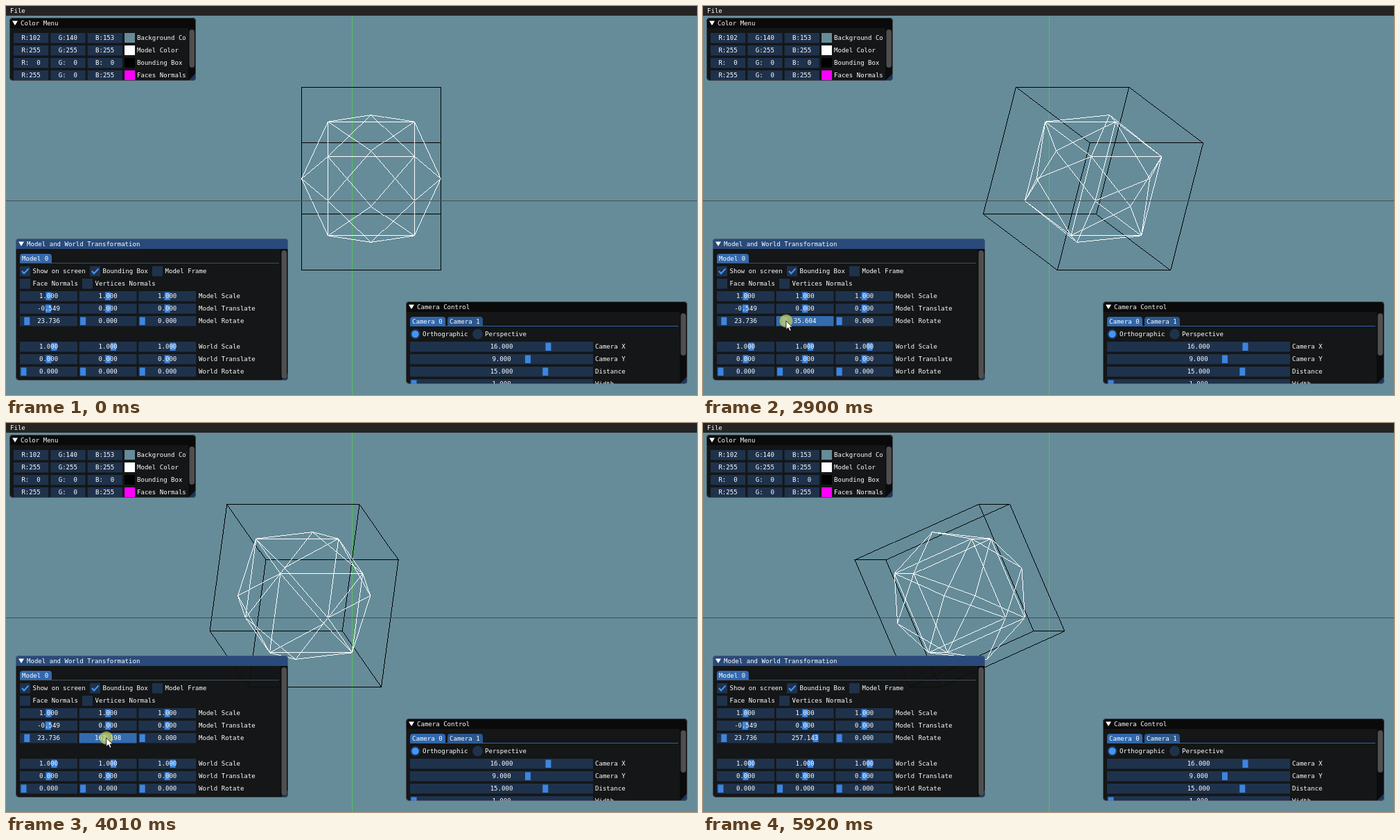
Recreate the animation shown at these times as an HTML page with a canvas. Size 997 px wide and 562 px high, loop 6.71 s.

```html
<!DOCTYPE html>
<html lang="en">
<head>
<meta charset="utf-8">
<title>Model viewer</title>
<style>
  html, body { margin: 0; width: 100%; height: 100%; overflow: hidden; background: #668c99; }
  canvas { display: block; }
</style>
</head>
<body>
<canvas id="stage" width="997" height="562"></canvas>
<script>
const g = document.getElementById('stage').getContext('2d');
const LOOP = 6710, RAD = Math.PI / 180;
const ENTER = 720, PRESS = 1880, RELEASE = 5710, LEAVE = 5915;
const UNIT = 562 / 9, TILT = 23.736, SHIFT = -.549, REACH = 1.608;
const FRAME = '#1f324c', GRAB = '#3d85e0', ACCENT = '#4296fa';

const progress = (t, start, end) => Math.min(1, Math.max(0, (t - start) / (end - start)));

// The drag: [time, slider steps], where 91 steps make a full turn
const drag = [[2240, 0], [2470, 2], [3300, 16], [4010, 41], [4960, 58], [5450, 65]];

function dragSteps(t) {
  return drag.slice(1).reduce((sum, [end, k], i) =>
    sum + (k - drag[i][1]) * progress(t, drag[i][0], end), 0);
}

function pointerAt(t) {
  const left = 1 - progress(t, ENTER, 1330);
  const away = progress(t, RELEASE - 40, 5850) ** 1.5;
  const held = 111.5 + .779 * dragSteps(t + 90);
  const settle = 20 * (1 - progress(t, 1360, 1660));
  return [held + settle + 371 * left ** 1.6 + 385 * away, 455 + 97 * left ** 3 + 70 * away];
}

function rect(x, y, w, h, color, radius = 0) {
  g.fillStyle = color;
  g.beginPath();
  g.roundRect(x, y, w, h, radius);
  g.fill();
}

function disc(x, y, r, color) {
  g.fillStyle = color;
  g.beginPath();
  g.arc(x, y, r, 0, 2 * Math.PI);
  g.fill();
}

function polygon(points, color) {
  g.fillStyle = color;
  g.beginPath();
  points.forEach(p => g.lineTo(...p));
  g.closePath();
  g.fill();
}

function text(s, x, y, align = 'left') {
  g.fillStyle = '#fff';
  g.textAlign = align;
  g.fillText(s, x, y + 3);
}

// Hard-edged one pixel line
function line([x0, y0], [x1, y1], color) {
  const n = Math.max(1, Math.round(Math.max(Math.abs(x1 - x0), Math.abs(y1 - y0))));
  g.fillStyle = color;
  for (let i = 0; i <= n; i++)
    g.fillRect(Math.floor(x0 + (x1 - x0) * i / n), Math.floor(y0 + (y1 - y0) * i / n), 1, 1);
}

function project([x, y, z], angle) {
  const c = Math.cos(TILT * RAD), s = Math.sin(TILT * RAD);
  const depth = y * s + z * c;
  const across = x * Math.cos(angle) + depth * Math.sin(angle) + SHIFT;
  return [498.7 + UNIT * across, 281.5 - UNIT * (y * c - z * s)];
}

const cube = half => [...Array(8).keys()].map(i => [0, 1, 2].map(a => 1 + (i >> a & 1 ? half : -half)));

function drawCube(points, color) {
  for (let i = 0; i < 8; i++)
    for (const bit of [1, 2, 4])
      if (!(i & bit)) line(points[i], points[i | bit], color);
}

function drawScene(angle) {
  const flat = p => project(p, angle);
  const corners = cube(1).map(flat);
  rect(0, 0, 997, 562, '#668c99');
  rect(499, 14, 1, 548, '#55c05a');
  drawCube(cube(REACH).map(flat), '#000');
  drawCube(corners, '#fff');
  for (let axis = 0; axis < 3; axis++)
    for (const side of [0, 1]) {
      const pole = [1, 1, 1];
      pole[axis] += side ? REACH : -REACH;
      corners.forEach((p, i) => { if ((i >> axis & 1) === side) line(flat(pole), p, '#fff'); });
    }
  rect(0, 281, 997, 1, '#434f52');
}

function panel(x, y, w, h, title, titleColor, bar, content) {
  g.save();
  g.beginPath();
  g.roundRect(x, y, w, h, 5);
  g.clip();
  rect(x, y, w, h, 'rgba(15,15,15,.94)');
  rect(x, y, w, 15, titleColor);
  polygon([[x + 4, y + 4.5], [x + 12, y + 4.5], [x + 8, y + 11]], '#fff');
  text(title, x + 16, y + 7.5);
  content();
  rect(x + w - 11, y + 15, 11, h - 15, 'rgba(5,5,5,.53)');
  polygon([[x + w, y + h - 11], [x + w, y + h], [x + w - 11, y + h]], '#1d3655');
  rect(x + w - 9.5, y + 17, 7.5, bar, '#4f4f4f', 4);
  g.restore();
  g.strokeStyle = 'rgba(110,110,128,.5)';
  g.lineWidth = 1;
  g.beginPath();
  g.roundRect(x + .5, y + .5, w - 1, h - 1, 5);
  g.stroke();
}

const field = (x, y, w, color = FRAME) => rect(x, y - 7, w, 14.5, color);

function slider(x, y, w, value, part, active) {
  field(x, y, w, active ? '#336baf' : FRAME);
  rect(x + 1.5 + part * (w - 11), y - 5.5, 8, 11.5, active ? ACCENT : GRAB);
  text(value.toFixed(3), x + w / 2, y, 'center');
}

function tab(s, x, y, w, color) {
  rect(x, y - 7, w, 14, color, [4, 4, 0, 0]);
  text(s, x + 3, y);
}

function checkbox(s, x, y, on) {
  field(x, y, 15);
  if (on) {
    g.strokeStyle = ACCENT;
    g.lineWidth = 2;
    g.beginPath();
    g.moveTo(x + 3, y);
    g.lineTo(x + 6, y + 3.5);
    g.lineTo(x + 12.5, y - 3.5);
    g.stroke();
  }
  text(s, x + 18.5, y);
}

function radio(s, x, y, on) {
  disc(x, y, 7.4, FRAME);
  if (on) disc(x, y, 5.2, ACCENT);
  text(s, x + 10.5, y);
}

function colorMenu() {
  const rows = { 'Background Color': '668c99', 'Model Color': 'ffffff', 'Bounding Box': '000000', 'Faces Normals': 'ff00ff' };
  g.save();
  g.beginPath();
  g.rect(5, 32, 255.5, 75);
  g.clip();
  Object.entries(rows).forEach(([name, hex], i) => {
    const y = 46 + 18 * i;
    [...'RGB'].forEach((channel, j) => {
      const x = 11 + 53.3 * j, value = parseInt(hex.slice(2 * j, 2 * j + 2), 16);
      field(x, y, 50.3);
      text(channel + ':' + String(value).padStart(3, '\u00a0'), x + 25, y, 'center');
    });
    rect(171, y - 7, 15, 14, '#' + hex);
    text(name, 189, y);
  });
  g.restore();
}

function transformMenu(angle, active) {
  tab('Model 0', 20, 365, 46, '#3369ad');
  rect(20, 371, 374, 1, '#41505f');
  checkbox('Show on screen', 20, 383, true);
  checkbox('Bounding Box', 121, 383, true);
  checkbox('Model Frame', 211, 383);
  checkbox('Face Normals', 20, 401);
  checkbox('Vertices Normals', 110, 401);
  const ones = [1, 1, 1], zeros = [0, 0, 0];
  const moved = v => .5 + v / 60, turned = v => v / 360;
  const groups = [
    ['Model', [ones, [SHIFT, 0, 0], [TILT, angle, 0]], [v => v / 2, moved, turned]],
    ['World', [ones, zeros, zeros], [v => v * .61, moved, turned]]
  ];
  groups.forEach(([owner, values, parts], n) =>
    ['Scale', 'Translate', 'Rotate'].forEach((kind, row) => {
      const y = 419 + 73 * n + 18 * row;
      values[row].forEach((v, i) =>
        slider(20 + 85.6 * i, y, 83, v, parts[row](v), active && n === 0 && row === 2 && i === 1));
      text(owner + ' ' + kind, 278, y);
    }));
}

function cameraMenu() {
  tab('Camera 0', 583, 456, 51, '#3068ad');
  tab('Camera 1', 637, 456, 51, '#2b568c');
  rect(583, 462, 387, 1, '#2f62a5');
  radio('Orthographic', 590.5, 474, true);
  radio('Perspective', 680.5, 474);
  const rows = { 'Camera X': 16, 'Camera Y': 9, 'Distance': 15, 'Width': 1 };
  Object.entries(rows).forEach(([name, v], i) => {
    slider(583, 492 + 18 * i, 264, v, name === 'Width' ? 0 : .5 + v / 60);
    text(name, 850, 492 + 18 * i);
  });
}

function pointer(x, y) {
  const outline = [[0, 0], [0, 12.5], [3, 9.8], [5.2, 14.5], [7.4, 13.5], [5.3, 9], [9.2, 9]];
  polygon(outline.map(([dx, dy]) => [x + dx, y + dy]), '#fff');
  g.strokeStyle = '#000';
  g.lineWidth = .8;
  g.stroke();
}

function draw(now) {
  const t = now % LOOP;
  const [x, y] = pointerAt(t);
  const angle = Math.round(dragSteps(t)) * 360 / 91;
  const pressed = t >= PRESS && t < RELEASE;
  g.font = '9.06px "DejaVu Sans Mono", monospace';
  drawScene(angle * RAD);
  rect(0, 0, 997, 14, '#242424');
  text('File', 6, 7);
  panel(5, 17, 269, 91, 'Color Menu', '#0a0a0a', 55, colorMenu);
  panel(14, 336, 393, 205, 'Model and World Transformation', '#294a7a', 185, () => transformMenu(angle, pressed));
  panel(577, 427, 406, 119, 'Camera Control', '#0a0a0a', 61, cameraMenu);
  if (pressed) disc(x, y, 9.5, 'rgba(205,210,80,.7)');
  if (t >= ENTER && t < LEAVE) pointer(x, y);
  requestAnimationFrame(draw);
}
requestAnimationFrame(draw);
</script>
</body>
</html>
```
